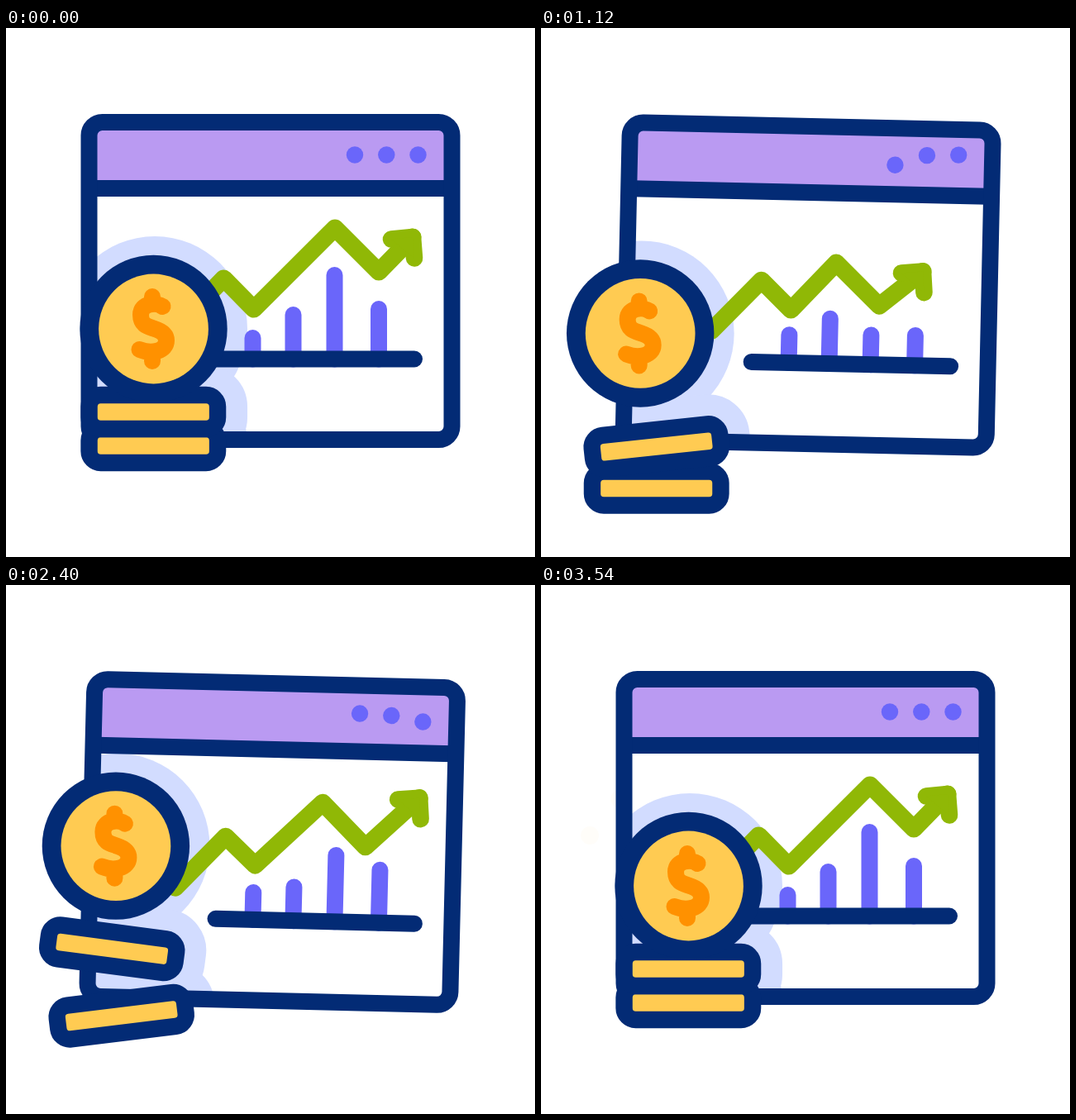
Animation, 640 px wide and 640 px high, one loop 3.6 s. Source, as an HTML page with a canvas:

```html
<!DOCTYPE html>
<html lang="en">
<head>
<meta charset="utf-8">
<title>Growing savings</title>
<style>
html, body { margin: 0; width: 100%; height: 100%; overflow: hidden; background: #fff; }
canvas { display: block; }
</style>
</head>
<body>
<canvas id="stage" width="640" height="640"></canvas>
<script>
const ctx = document.getElementById('stage').getContext('2d');
const LOOP = 3600, START = 200, HALF_SWING = 645, SETTLED = 3200;
const NAVY = '#032b75', LILAC = '#ba9af2', VIOLET = '#6a66fa', GREEN = '#90b806',
      GOLD = '#ffcb52', ORANGE = '#ff9100', HALO = '#d2dcff';

const clamp = u => Math.min(1, Math.max(0, u));
// Eased progress from 0 to 1 between two times
const ease = (t, from, to) => 0.5 - 0.5 * Math.cos(Math.PI * clamp((t - from) / (to - from)));

// Leaves rest, rocks between a and b (a is first reached at time `first`), returns to rest.
function swing(t, first, a, b) {
  const last = first + 3 * HALF_SWING;
  if (t < first) return a * ease(t, START, first);
  if (t > last) return b * (1 - ease(t, last, SETTLED));
  return (a + b) / 2 + (a - b) / 2 * Math.cos(Math.PI * (t - first) / HALF_SWING);
}

const panelPose = t => ({
  x: 320 + swing(t, 755, -21, 19),
  y: 306 + 5 * (ease(t, START, 800) - ease(t, 2700, SETTLED)),
  tilt: swing(t, 887, 3, -3)
});

// Each piece of the pile follows the one below and adds its own hop.
function pilePoses(t) {
  const slide = -38.6 * (ease(t, START, 800) - ease(t, 2400, SETTLED));
  const drop = 51.5 * (ease(t, START, 800) - ease(t, 1900, 2700));
  const hop = -15 * ease(t, 800, 1350) - 25 * ease(t, 1750, 2400) + 40 * ease(t, 2500, SETTLED);
  const slip = -12 * (ease(t, 1750, 2500) - ease(t, 2900, 3250));
  const lag = -32 * ease(t, START, 800) + 25 * ease(t, 800, 1450) + 7 * ease(t, 3000, 3300);
  const float = -37 * (ease(t, 700, 1150) - ease(t, 2000, 3000));
  return {
    slabs: [{
      x: 178.3 + slide,
      y: 505.5 + drop,
      tilt: -7 * (ease(t, 1900, 2350) - ease(t, 2450, 3000))
    }, {
      x: 178.3 + slide + slip,
      y: 464.5 + drop + hop,
      tilt: -7.5 * ease(t, 800, 1250) + 15 * ease(t, 1750, 2350) - 7.5 * ease(t, 3000, 3250)
    }],
    coin: { x: 178.5 + slide + lag, y: 364 + drop + hop + float, tilt: 0 }
  };
}

const dollar = new Path2D('M11 -27C4 -32 -15.5 -32 -15.5 -17C-15.5 -4 -6 -2.5 0 -.5'
  + 'C8 2 15.5 6 15.5 14C15.5 27 -2 31 -17 25M-1.5 -39V-30M-1.5 39V29');

function place(pose) {
  ctx.translate(pose.x, pose.y);
  ctx.rotate(pose.tilt * Math.PI / 180);
}

function at(pose, draw) {
  ctx.save();
  place(pose);
  draw();
  ctx.restore();
}

function fill(color) {
  ctx.fillStyle = color;
  ctx.fill();
}

function stroke(color, width, path) {
  ctx.strokeStyle = color;
  ctx.lineWidth = width;
  path ? ctx.stroke(path) : ctx.stroke();
}

function line(color, width, ...points) {
  ctx.beginPath();
  points.forEach(([x, y]) => ctx.lineTo(x, y));
  stroke(color, width);
}

function disc(x, y, r, color) {
  ctx.beginPath();
  ctx.arc(x, y, r, 0, 7);
  fill(color);
}

function box(w, h, r) {
  ctx.beginPath();
  ctx.roundRect(-w / 2, -h / 2, w, h, r);
}

function drawHalo(panel, { slabs, coin }) {
  ctx.save();
  place(panel);
  ctx.beginPath();
  ctx.rect(-215, -108, 430, 296);
  ctx.clip();
  ctx.resetTransform();
  at(coin, () => disc(1.5, 0, 112, HALO));
  slabs.forEach(slab => at(slab, () => {
    box(155.5, 41, 14);
    fill(HALO);
    stroke(HALO, 72);
  }));
  ctx.restore();
}

function drawPanel(t) {
  ctx.fillStyle = LILAC;
  ctx.fillRect(-215, -188, 430, 72);
  line(NAVY, 20, [-215, -112], [215, -112]);
  box(439, 384, 16);
  stroke(NAVY, 20);

  // Everything inside bends away from rest and back; `lean` shifts the weight from early to late.
  const u = clamp((t - START) / 2800);
  const bend = Math.abs(Math.sin(Math.PI * u ** 0.78)) ** 1.4;
  const lean = Math.cos(4.8 * u - 0.5);
  const mix = (rest, steady, early) => rest + bend * (steady + early * lean);

  disc(102, mix(-152.5, -1, 13), 10.2, VIOLET);
  disc(140.3, mix(-152.5, -8.5, 1.5), 10.2, VIOLET);
  disc(178.5, mix(-152.5, -4, -11), 10.2, VIOLET);

  const bar = (x, height) => line(VIOLET, 20, [x, 94.5], [x, 104.5 - height]);
  bar(-21.5, mix(35.5, 12, -7));
  bar(27.5, mix(63.5, -10, 23));
  bar(77.5, mix(111.5, -64, -10));
  bar(131, mix(70.5, -14.4, -23));
  line(NAVY, 20, [-66.5, 94.5], [174, 94.5]);

  const pull = 46.5 * bend, retreat = mix(0, 20, 32);
  const tip = [172 - retreat, -53 + retreat];
  line(GREEN, 21.2, [-116, 58], [-56.6, mix(-3, -3, 3)], [-20.2, mix(34, -7, 7)],
    [78 - pull, -64 + 0.82 * pull], [131 - pull, -11 + 0.77 * pull], tip);
  line(GREEN, 20.6, [tip[0] - 26, tip[1] + 2.5], tip, [tip[0] + 2, tip[1] + 25.5]);
  fill(GREEN);
}

function drawSparks(t) {
  if (t < 3240 || t > 3560) return;
  const reach = 104 + (t - 3240) * 0.1;
  ctx.globalAlpha = ((3560 - t) / 320) ** 1.2;
  for (const angle of [-2.67, -2.24])
    disc(178.5 + reach * Math.cos(angle), 364 + reach * Math.sin(angle), 11, GOLD);
  ctx.globalAlpha = 1;
}

function drawPile({ slabs, coin }) {
  slabs.forEach(slab => at(slab, () => {
    box(155.5, 41, 14);
    fill(GOLD);
    stroke(NAVY, 20.4);
  }));
  at(coin, () => {
    disc(0, 0, 89.2, NAVY);
    disc(0, 0, 66.4, GOLD);
    stroke(ORANGE, 20, dollar);
  });
}

function frame() {
  const t = performance.now() % LOOP;
  const panel = panelPose(t), pile = pilePoses(t);
  ctx.fillStyle = '#fff';
  ctx.fillRect(0, 0, 640, 640);
  ctx.lineCap = ctx.lineJoin = 'round';
  drawSparks(t);
  drawHalo(panel, pile);
  at(panel, () => drawPanel(t));
  drawPile(pile);
  requestAnimationFrame(frame);
}

frame();
</script>
</body>
</html>
```
